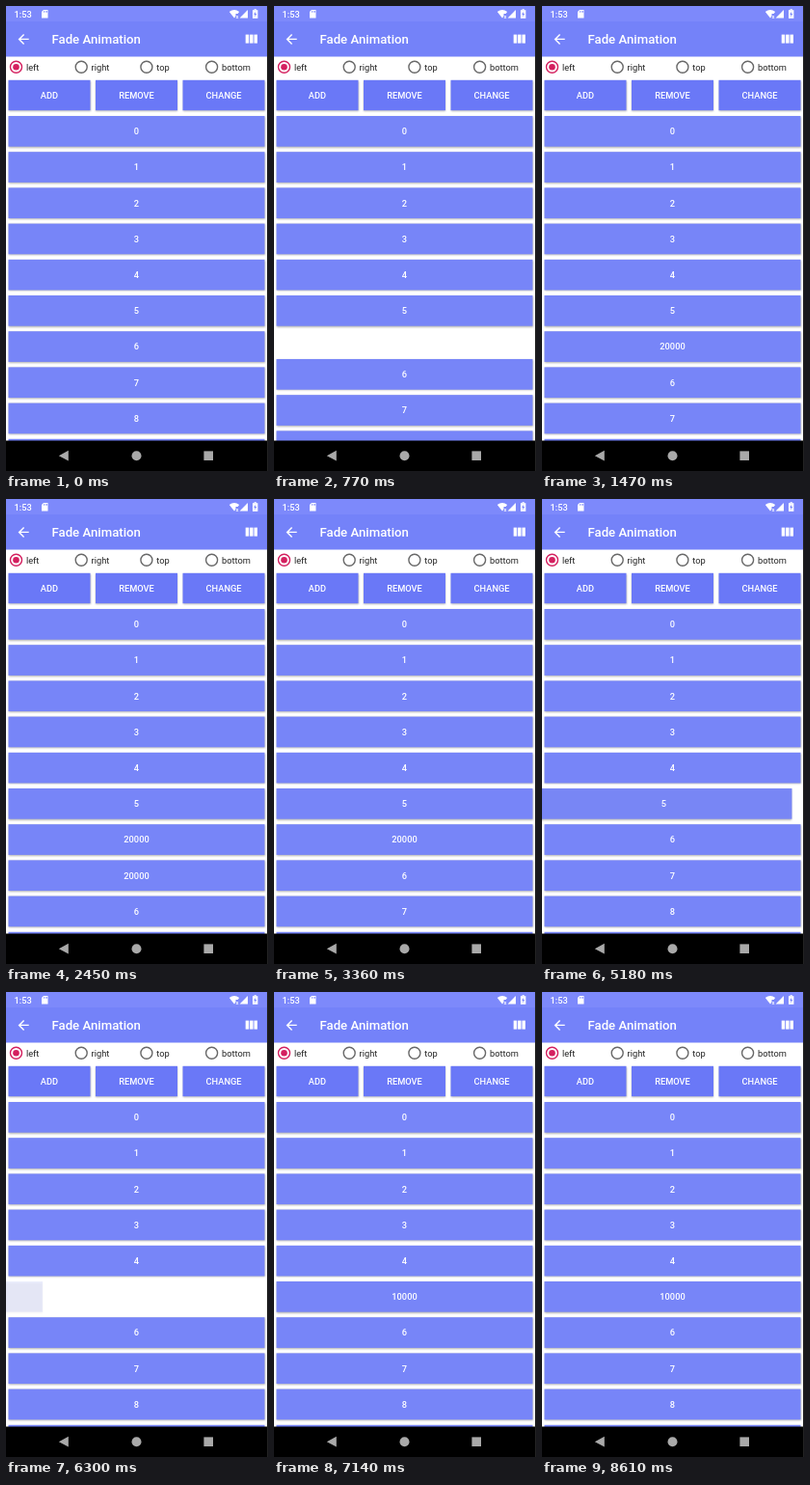
Animation, 272 px wide and 482 px high, one loop 8750 ms. Source, as an HTML page with a canvas:

```html
<!DOCTYPE html>
<html lang="en">
<head>
<meta charset="utf-8">
<title>Fade Animation</title>
<style>
  html, body { margin: 0; width: 100%; height: 100%; overflow: hidden; background: #fff; }
  canvas { display: block; width: 272px; height: 482px; }
</style>
</head>
<body>
<canvas id="stage"></canvas>
<script>
const W = 272, H = 482, LOOP = 8750;
const FONT = 'Roboto, sans-serif';
const ROW = { x: 2.5, y: 114, w: 266, h: 31.7, pitch: 37.2 };
const canvas = document.getElementById('stage');
const ctx = canvas.getContext('2d');
const scale = window.devicePixelRatio || 1;
canvas.width = W * scale;
canvas.height = H * scale;

function rect(x, y, w, h, color) {
  ctx.fillStyle = color;
  ctx.fillRect(x, y, w, h);
}

function shape(points, color) {
  ctx.fillStyle = color;
  ctx.beginPath();
  points.forEach(([x, y]) => ctx.lineTo(x, y));
  ctx.fill();
}

function circle(x, y, r, color) {
  ctx.fillStyle = color;
  ctx.beginPath();
  ctx.arc(x, y, r, 0, Math.PI * 2);
  ctx.fill();
}

function text(label, x, y, { size = 9.27, weight = 500, color = '#fff', align = 'left' } = {}) {
  ctx.font = `${weight} ${size}px ${FONT}`;
  ctx.textAlign = align;
  ctx.fillStyle = color;
  ctx.fillText(label, x, y);
}

function button(label, x, y, w, h, color) {
  ctx.save();
  ctx.shadowColor = 'rgba(0,0,0,.3)';
  ctx.shadowBlur = 2 * scale;
  ctx.shadowOffsetY = 0.8 * scale;
  rect(x, y, w, h, color);
  ctx.restore();
  text(label, x + w / 2, y + h / 2 + 3.3, { align: 'center' });
}

function radio(label, x, selected) {
  const color = selected ? '#d4205f' : '#686868';
  ctx.strokeStyle = color;
  ctx.lineWidth = 1.4;
  ctx.beginPath();
  ctx.arc(x, 63.3, 6, 0, Math.PI * 2);
  ctx.stroke();
  if (selected) circle(x, 63.3, 3.3, color);
  text(label, x + 10.4, 66.6, { weight: 400, color: '#222' });
}

function statusBar() {
  rect(0, 0, W, 16, '#7d89fb');
  text('1:53', 8.5, 12);
  shape([[39, 4], [43.5, 4], [43.5, 12.5], [37, 12.5], [37, 6]], '#fff');
  for (const x of [39.2, 40.8, 42.2]) rect(x, 5, 0.7, 1.8, '#7d89fb');

  ctx.fillStyle = '#fff';
  ctx.beginPath();
  ctx.moveTo(237, 12.5);
  ctx.lineTo(231.8, 6);
  ctx.quadraticCurveTo(237, 2, 242.2, 6);
  ctx.fill();
  rect(238.5, 8, 4, 5, '#7d89fb');
  text('x', 238.6, 12.6, { size: 6 });
  shape([[251, 4], [251, 12.5], [242.6, 12.5]], '#fff');

  rect(256, 4.2, 5.4, 8.6, '#fff');
  rect(257.6, 3.2, 2.2, 1.2, '#fff');
  shape([[259.3, 5.5], [257.2, 9], [258.5, 9], [258.2, 11.5], [260.3, 8], [259, 8]], '#7d89fb');
}

function appBar() {
  rect(0, 16, W, 36.5, '#7482f9');
  ctx.strokeStyle = '#fff';
  ctx.lineWidth = 1.4;
  ctx.beginPath();
  ctx.moveTo(23.7, 34.4);
  ctx.lineTo(14, 34.4);
  ctx.moveTo(18.6, 29.4);
  ctx.lineTo(13.6, 34.4);
  ctx.lineTo(18.6, 39.4);
  ctx.stroke();
  text('Fade Animation', 47.5, 39.2, { size: 13.2 });
  for (let i = 0; i < 3; i++) rect(248.7 + i * 4.4, 29.6, 3.5, 9, '#fff');
}

function navBar() {
  const grey = '#a9a9a9';
  rect(0, 450.5, W, H - 450.5, '#000');
  shape([[64.8, 460.8], [64.8, 471.6], [54.8, 466.2]], grey);
  circle(135.5, 466.2, 5, grey);
  rect(205.4, 461.4, 9.6, 9.6, grey);
}

// Accelerate-decelerate progress from 0 to 1.
function ease(t, start, duration) {
  const p = Math.min(1, Math.max(0, (t - start) / duration));
  return 0.5 - 0.5 * Math.cos(Math.PI * p);
}

// Rows slide in from the left edge and fade together with their presence.
function row(label, index, presence = 1) {
  if (presence <= 0) return;
  ctx.globalAlpha = presence;
  button(label, ROW.x - ROW.w * (1 - presence), ROW.y + index * ROW.pitch, ROW.w, ROW.h, '#7785f8');
  ctx.globalAlpha = 1;
}

function list(t) {
  const move = start => ease(t, start, 250);
  const push1 = move(600), push2 = move(1650);
  const pull1 = move(3050), pull2 = move(4050);

  for (let i = 0; i < 5; i++) row(i, i);
  row('5', 5, 1 - ease(t, 5063, 1000));
  row('10000', 5, ease(t, 6063, 1000));
  row('20000', 6 + push2 - pull1, ease(t, 850, 300) - ease(t, 3800, 250));
  row('20000', 6, ease(t, 1900, 300) - ease(t, 2800, 250));
  const shift = push1 + push2 - pull1 - pull2;
  for (let i = 6; i < 12; i++) row(i, i + shift);
}

function draw() {
  const t = performance.now() % LOOP;
  ctx.setTransform(scale, 0, 0, scale, 0, 0);
  rect(0, 0, W, H, '#fff');
  list(t);
  statusBar();
  appBar();
  ['left', 'right', 'top', 'bottom'].forEach((label, i) => radio(label, 10.5 + i * 67.7, i === 0));
  ['ADD', 'REMOVE', 'CHANGE'].forEach((label, i) => button(label, 2.5 + i * 90.5, 76.8, 85, 31.4, '#6a78f7'));
  navBar();
  rect(271, 0, 1, H, '#222');
  requestAnimationFrame(draw);
}
draw();
</script>
</body>
</html>
```
